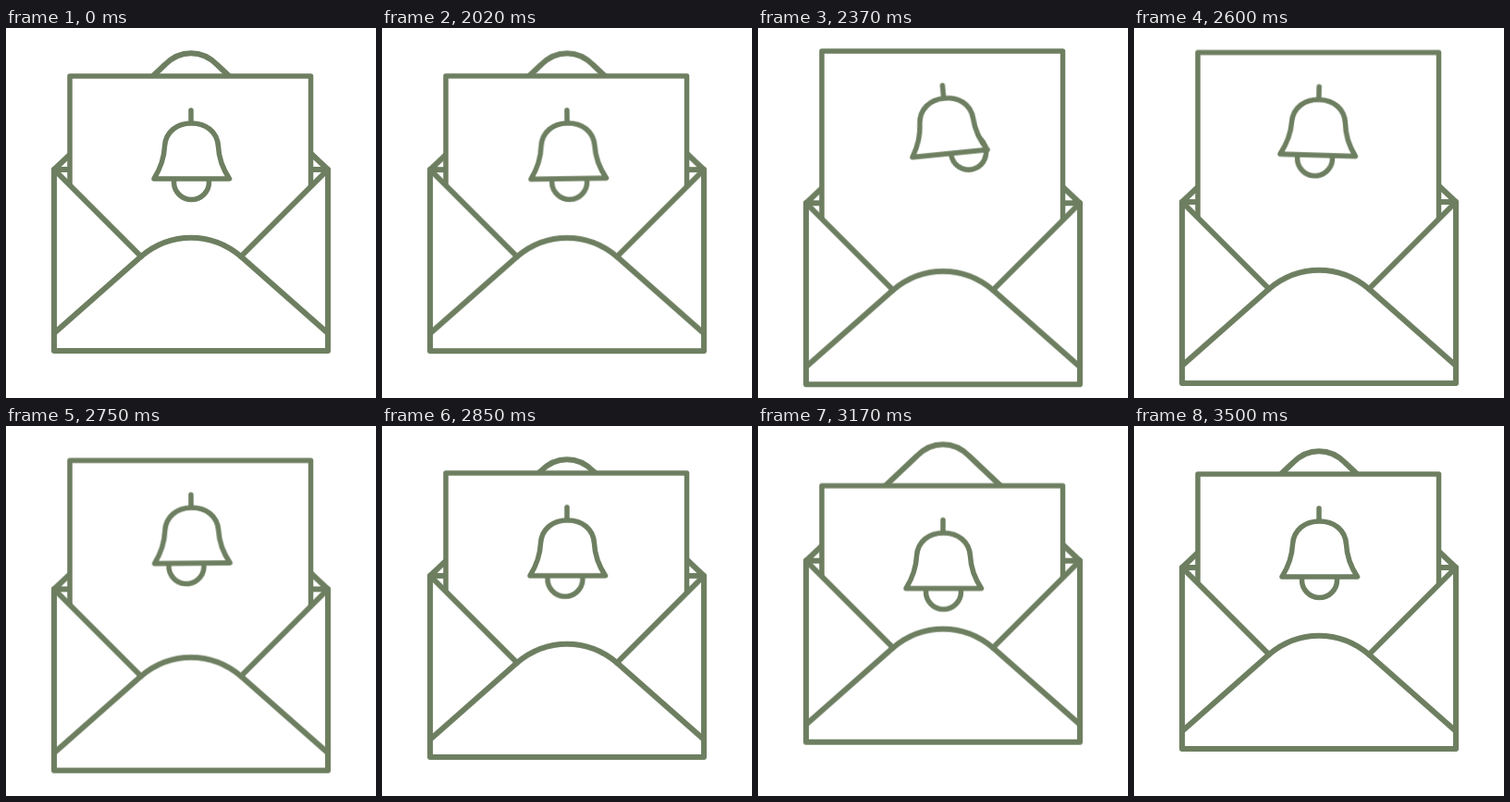
An HTML page that plays this animation: 400 by 400 pixels, repeating every 3520 ms.

```html
<!DOCTYPE html>
<html lang="en">
<head>
<meta charset="utf-8">
<title>Ringing bell letter</title>
<style>
  html, body { margin: 0; height: 100%; overflow: hidden; background: #fff; }
  svg { display: block; width: 100vw; height: 100vh; }
  path { fill: none; stroke: #6d7f60; stroke-width: 6; stroke-linecap: round; stroke-linejoin: round; }
  .paper path, .clapper { stroke-width: 5.5; }
  .solid, .clapper { fill: #fff; }
  .clapper { stroke: #6d7f60; }

  .envelope, .paper, .bell, .clapper {
    animation: 3520ms ease-in-out infinite;
  }
  .envelope { animation-name: envelope; }
  .paper { animation-name: paper; }
  .bell, .clapper { transform-origin: 200.5px 95px; }
  .bell { animation-name: ring; }
  .clapper { animation-name: clap; }

  @keyframes envelope {
    0%, 56.82% { transform: translateY(0); animation-timing-function: cubic-bezier(.4, 0, .5, 1); }
    69.6% { transform: translateY(38px); animation-timing-function: cubic-bezier(.65, 0, .7, 1); }
    86.08% { transform: translateY(-9px); }
    99.43%, 100% { transform: translateY(0); }
  }
  @keyframes paper {
    0%, 56.82% { transform: translateY(0); animation-timing-function: cubic-bezier(.4, 0, .5, 1); }
    69.6% { transform: translateY(-28.3px); animation-timing-function: cubic-bezier(.65, 0, .7, 1); }
    86.08% { transform: translateY(15.5px); }
    99.43%, 100% { transform: translateY(0); }
  }
  @keyframes ring {
    0%, 56.82% { transform: rotate(0deg); }
    59.09% { transform: rotate(-6deg); }
    63.35% { transform: rotate(6deg); }
    67.61% { transform: rotate(-5.8deg); }
    72.16% { transform: rotate(5deg); }
    76.42% { transform: rotate(-4.5deg); }
    78.69%, 100% { transform: rotate(0deg); }
  }
  @keyframes clap {
    0%, 56.82% { transform: rotate(0deg); }
    59.94% { transform: rotate(-12deg); }
    63.92% { transform: rotate(16deg); }
    67.47% { transform: rotate(-16.6deg); }
    71.88% { transform: rotate(14deg); }
    75.85% { transform: rotate(-9deg); }
    78.69% { transform: rotate(6deg); }
    83.81% { transform: rotate(-3.6deg); }
    87.78%, 100% { transform: rotate(0deg); }
  }
</style>
</head>
<body>
<svg viewBox="0 0 400 400">
  <g class="envelope">
    <path d="M52 153L172 39.5C188 23 212 23 228 39.5L348 153Z"/>
  </g>
  <g class="paper">
    <path class="solid" d="M69 52H329.5V320H69Z"/>
    <g class="bell">
      <circle class="clapper" cx="200.5" cy="166.5" r="19"/>
      <path d="M200 89V101"/>
      <path class="solid" d="M160 163C168 150 171 140 171.5 128C172.5 112 185 103 200.5 103C216 103 228.500 112 229.500 128C230 140 233 150 241.500 163Z"/>
    </g>
  </g>
  <g class="envelope">
    <path class="solid" d="M52 153L146 247C178 220 222 220 254 247L348 153V349H52Z"/>
    <path d="M52 330L146 247M348 330L254 247"/>
  </g>
</svg>
</body>
</html>
```
